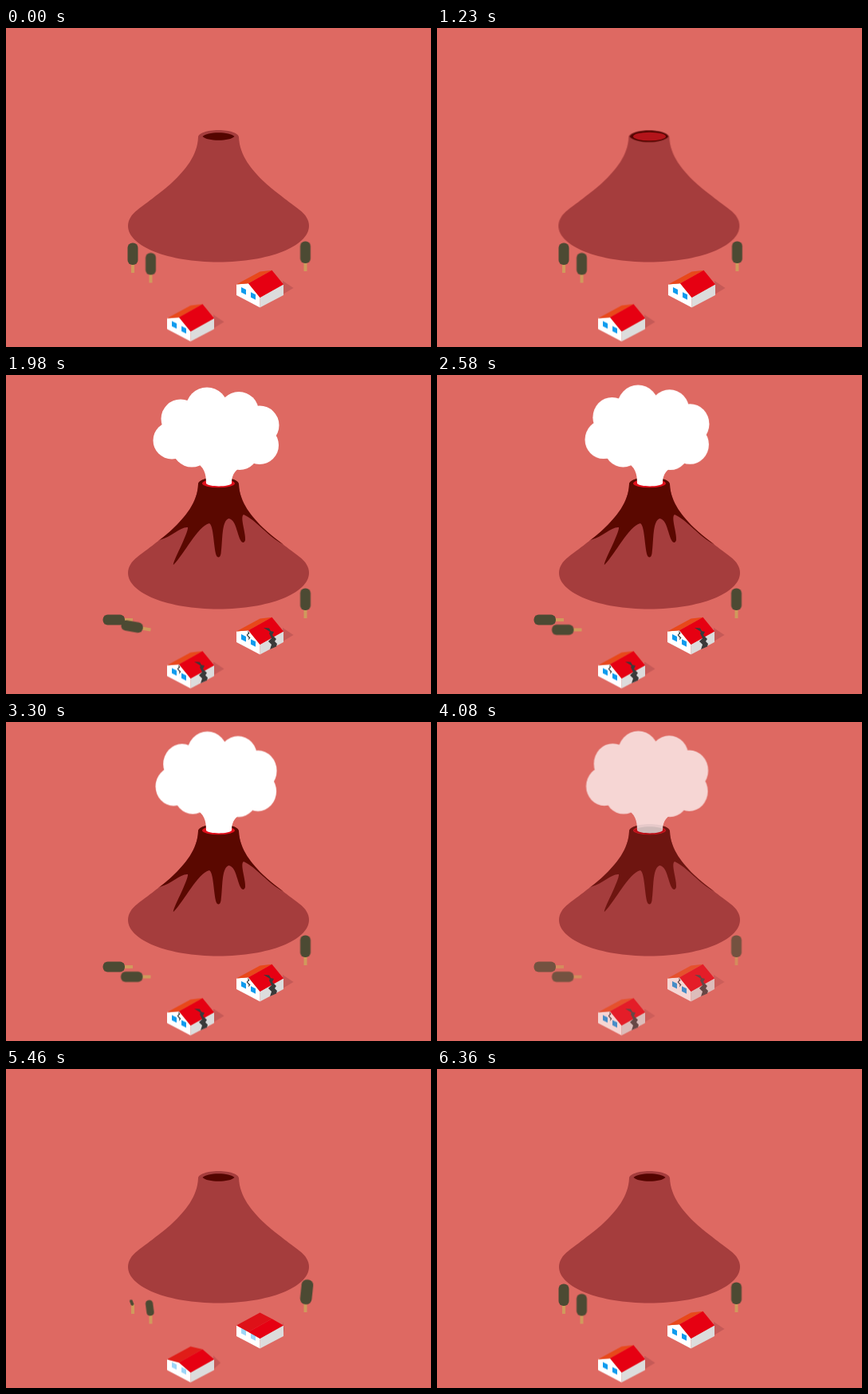
An HTML page that plays this animation: 533x400 px, repeating every 6390 ms.

```html
<!DOCTYPE html>
<html lang="en">
<head>
<meta charset="utf-8">
<title>Volcano</title>
<style>
html, body { margin: 0; width: 100%; height: 100%; overflow: hidden; background: #de6962; }
svg { display: block; width: 100vw; height: 100vh; }
.tree g, .trunk { transform-origin: 0 0; }
.crown { transform-origin: 0 -10.5px; fill: #4c4a33; }
.trunk { fill: #d09a5c; }
.body { transform-origin: 318.5px 343px; }
.shadow { transform-origin: 347px 326px; fill: #c55a57; }
.window { fill: #0f9bee; }
.crack { fill: #3a3a3a; }
#hole, #lava { transform-origin: 266.5px 136px; }
#coat { transform-origin: 266.5px 129px; }
#smoke { transform-origin: 267px 138px; fill: #fff; }
#puffs { transform-origin: 265px 118px; }
</style>
</head>
<body>
<svg viewBox="0 0 533 400">
  <defs>
    <path id="cone" d="M241 137C240 160 225 178 208 194C196 205 170 224 165 228C157 234 153 241 153 248C153 274 204 293.5 266.5 293.5S380 274 380 248C380 241 376 234 368 228C363 224 337 205 325 194C308 178 293 160 292 137C292 132 281 128 266.5 128S241 132 241 137Z"/>
    <clipPath id="coneClip"><use href="#cone"/></clipPath>
  </defs>
  <g id="mountain">
    <use href="#cone" fill="#a53d3d"/>
    <path id="hole" fill="#540500" d="M246.5 136C252 129.5 281 129.5 286.5 136C281 142.3 252 142.3 246.5 136Z"/>
  </g>
  <g id="life">
    <g clip-path="url(#coneClip)">
      <path id="coat" fill="#5a0800" d="M230 120H303L352 214L347 212C328 202 314 182 298 175C293 178 301 198 300 207C299 211 296 211 294 207C289 196 288 181 279 180C270 184 272 207 269.5 224C268.5 230 264.5 230 263 224C260 208 260 189 255 186C240 190 224 224 210 238C208 236 229 198 228 191C219 190 207 203 195 206L185 210Z"/>
    </g>
    <ellipse id="lava" cx="266.5" cy="136" rx="20.5" ry="5.2"/>
    <g id="smoke">
      <path d="M236 108C249 115 251 124 251 136C254 140.5 280 140.5 283 136C283 124 288 117 302 112V90H236Z"/>
      <g id="puffs"></g>
    </g>
    <g id="things"></g>
  </g>
</svg>
<script>
const LOOP = 6390;
const $ = id => document.getElementById(id);
const rules = [], tracks = {};

// keys: [ms, value, easing]; the first and last values are held to the loop's ends
function anim(sel, prop, keys) {
  const name = 'k' + rules.length;
  const all = [[0, keys[0][1]], ...keys, [LOOP, keys[keys.length - 1][1]]];
  rules.push(`@keyframes ${name}{` + all.map(([t, v, ease = 'linear']) =>
    `${(t / LOOP * 100).toFixed(4)}%{${prop}:${v};animation-timing-function:${ease}}`).join('') + '}');
  (tracks[sel] ||= []).push(`${name} ${LOOP}ms infinite`);
}

function shake(sel, amp, phase) {
  const keys = [[840, 'translateX(0px)']];
  for (let i = 1; i < 22; i++) {
    keys.push([840 + i * 30, `translateX(${(amp * Math.sin(i * 1.9 + phase)).toFixed(2)}px)`]);
  }
  keys.push([1500, 'translateX(0px)']);
  anim(sel, 'transform', keys);
}

function tree(id, x, y, phase, delay, fall) {
  $('things').innerHTML += `<g class="tree" transform="translate(${x} ${y})"><g id="${id}"><g class="fall">
    <rect class="trunk" x="-2" y="-12" width="4" height="12"/>
    <rect class="crown" x="-6.5" y="-37.5" width="13" height="27.5" rx="6"/></g></g></g>`;
  shake('#' + id, 1, phase);
  if (fall) {
    anim(`#${id} .fall`, 'transform',
      [...fall, [4890, -90], [4891, 0]].map(([t, a, e]) => [t, `rotate(${a}deg)`, e]));
  }
  anim(`#${id} .trunk`, 'transform', [[4890, 'scaleY(1)'], [4891, 'scaleY(0)'],
    [5040 + delay, 'scaleY(0)', 'ease-out'], [5220 + delay, 'scaleY(1)']]);
  const pose = (t, a, s, e) => [t, `rotate(${a}deg) scale(${s})`, e];
  const d = delay;
  anim(`#${id} .crown`, 'transform', [
    pose(4890, 0, 1), pose(4891, -30, 0), pose(5220 + d, -30, 0),
    pose(5460 + d, 6, 1.13), pose(5510 + d, 8, 1.12, 'ease-in-out'),
    pose(5670 + d, -4, .95, 'ease-in-out'), pose(5830 + d, 2, 1.03, 'ease-in-out'),
    pose(5990 + d, -1, .99, 'ease-in-out'), pose(6130 + d, 0, 1)]);
}

// roof lift h raises the ridge above the eaves
const front = h => `M289 321.5L304 ${329.8 - h}L318.5 338V350.5L289 335Z`;
const left = h => `M289 321.5L318.5 305.5L333.5 ${313.3 - h}L304 ${329.8 - h}Z`;
const right = h => `M304 ${329.8 - h}L333.5 ${313.3 - h}L348 321.5L318.5 338Z`;

function house(id, dx, dy, phase, delay) {
  const H = 9.5;
  $('things').innerHTML += `<g transform="translate(${dx} ${dy})"><g id="${id}"><g class="body">
    <path class="shadow" d="M347 317L360.5 326L347 334Z"/>
    <path class="front" fill="#fff" d="${front(H)}"/>
    <path fill="#dcdcdc" d="M318.5 338L348 321.5V335L318.5 350.5Z"/>
    <path class="window" d="M295 325L301 328V334.5L295 331.5ZM307 331.2L313 334.2V340.7L307 337.7Z"/>
    <path class="left" fill="#e8481a" d="${left(H)}"/>
    <path class="right" fill="#e60012" d="${right(H)}"/>
    <path class="crack" d="M323 317L330 317.5L332 321L336 322L334 326L339 331L337 334L340 337L339 340.5L331 344L333 338L329 334L333 330L330 324L331 322L328 320ZM303.5 320.5L305.5 324L303 326L306.5 329.5L304 332.5L304.5 329.5L301.5 326L303.5 324Z"/>
  </g></g></g>`;
  const part = c => `#${id} ${c}`;
  shake('#' + id, 1, phase);
  anim(part('.body'), 'transform', [[4890, 'scale(1)'], [4891, 'scale(0)'],
    [4920 + delay, 'scale(0)', 'ease-out'], [5160 + delay, 'scale(1.05)', 'ease-in-out'],
    [5300 + delay, 'scale(1)']]);
  const lift = [[4890, 1], [4891, 0], [5370 + delay, 0], [5600 + delay, 1.15, 'ease-in-out'],
    [5750 + delay, .95, 'ease-in-out'], [5900 + delay, 1]];
  for (const [c, shape] of [['.front', front], ['.left', left], ['.right', right]]) {
    anim(part(c), 'd', lift.map(([t, k, e]) => [t, `path("${shape(H * k)}")`, e]));
  }
  anim(part('.left'), 'fill', [[4890, '#e8481a'], [4891, '#e60012'],
    [5400 + delay, '#de1218'], [5700 + delay, '#e8481a']]);
  anim(part('.window'), 'opacity', [[4890, 1], [4891, 0], [5400, 0], [5550, 1]]);
  anim(part('.shadow'), 'transform', [[4890, 'scaleX(1)'], [4891, 'scaleX(0)'],
    [5340 + delay, 'scaleX(0)'], [5520 + delay, 'scaleX(1)']]);
  anim(part('.crack'), 'clip-path', [[1530 + delay, 'inset(0 0 100% 0)', 'ease-out'],
    [1770 + delay, 'inset(0 0 0% 0)'], [4890, 'inset(0 0 0% 0)'], [4891, 'inset(0 0 100% 0)']]);
}

const puffs = [[219, 55, 24.5], [252, 42, 26.5], [292, 46, 25], [318, 63, 24.5], [318, 88, 24],
  [293, 95, 24], [233, 91, 24.5], [208, 82, 23.5], [265, 80, 37]];
$('puffs').innerHTML = puffs.map(([x, y, r]) => `<circle cx="${x}" cy="${y}" r="${r}"/>`).join('');

tree('treeA', 159, 307, .43, 180, [[1500, 0, 'ease-in'], [1770, -90, 'ease-out'],
  [1850, -83, 'ease-in'], [1940, -90]]);
tree('treeB', 181.5, 319.5, .43, 90, [[1590, 0, 'ease-in'], [1890, -90, 'ease-out'],
  [1980, -80, 'ease-in'], [2100, -90, 'ease-out'], [2170, -87, 'ease-in'], [2240, -90]]);
tree('treeC', 375.5, 305, 2, 0);
house('houseA', 0, 0, 2, 90);
house('houseB', -87, 42.5, .43, 0);

shake('#mountain', .7, -1.14);
anim('#life', 'opacity', [[3960, 1], [4380, .05], [4890, .05], [4891, 0], [4892, 1]]);
anim('#hole', 'transform', [[840, 'scale(1)'], [1140, 'scale(1.22, 1.5)'],
  [2100, 'scale(1.22, 1.5)'], [2300, 'scale(1)']]);
anim('#lava', 'transform', [[960, 'scale(0)', 'ease-out'], [1220, 'scale(1)'],
  [4890, 'scale(1)'], [4891, 'scale(0)']]);
anim('#lava', 'fill', [[1230, '#b3141a'], [1500, '#e0101c'], [4890, '#e0101c'], [4891, '#b3141a']]);
anim('#coat', 'transform', [[1260, 'scaleY(0)', 'ease-out'], [1800, 'scaleY(1)'],
  [4890, 'scaleY(1)'], [4891, 'scaleY(0)']]);
anim('#smoke', 'transform', [[1290, 'scale(0)', 'ease-out'], [1470, 'scale(1)'],
  [4890, 'scale(1)'], [4891, 'scale(0)']]);
anim('#puffs', 'transform', [[1470, .97, .95], [1740, .97, 1.03], [1980, 1, 1], [2400, .96, 1.068],
  [2700, 1, 1.01], [3060, .965, 1.068], [3300, .962, 1.035], [3600, .985, 1.02], [4380, .962, 1.05]]
  .map(([t, x, y]) => [t, `scale(${x}, ${y})`, 'ease-in-out']));

const style = document.createElement('style');
style.textContent = rules.join('\n') +
  Object.entries(tracks).map(([sel, list]) => `${sel}{animation:${list.join()}}`).join('\n');
document.head.append(style);
</script>
</body>
</html>
```
